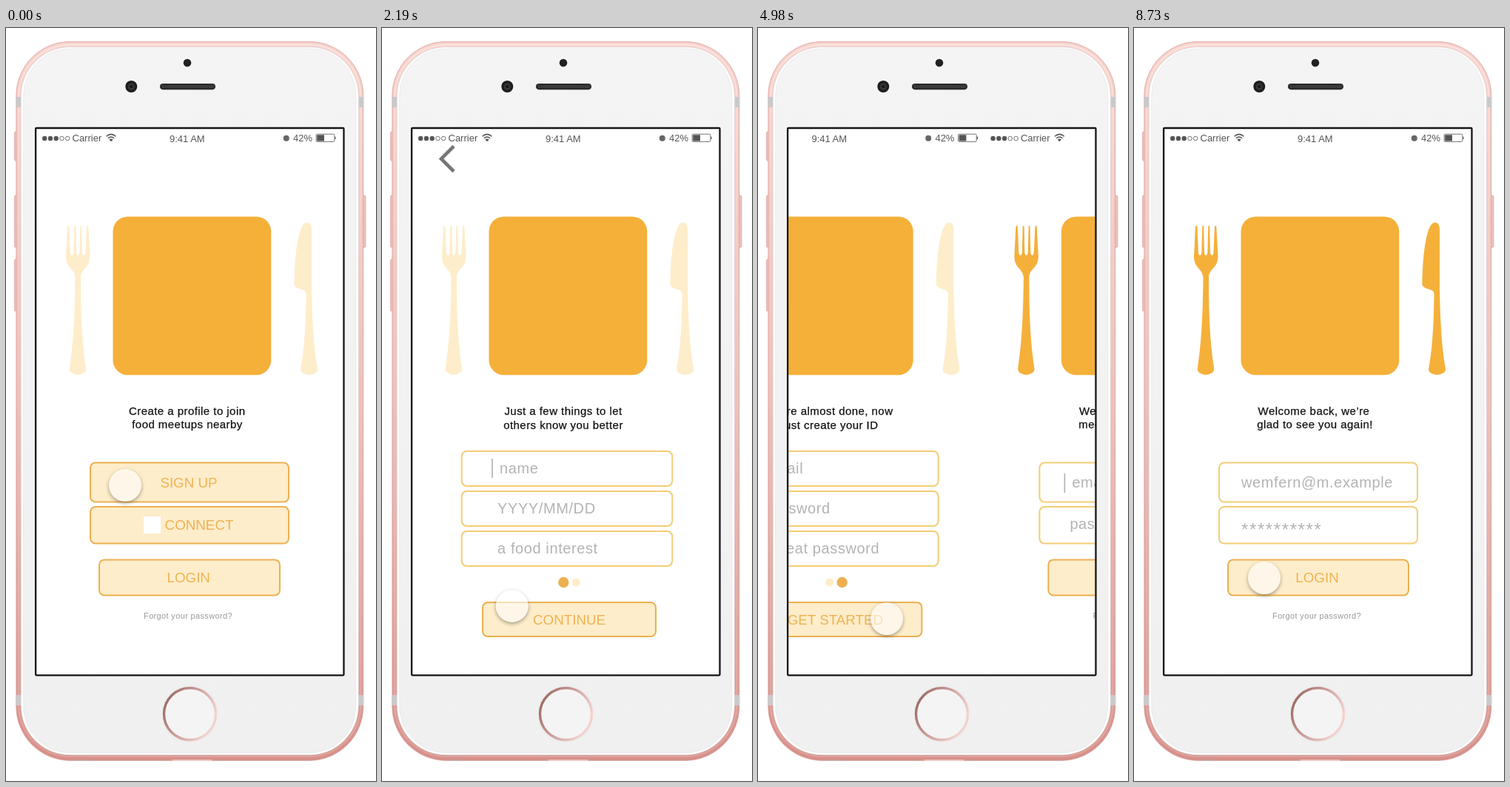
Recreate the animation shown at these times as an HTML page. Size 500 px wide and 1016 px high, loop 8.76 s.

```html
<!DOCTYPE html>
<html lang="en">
<head>
<meta charset="utf-8">
<title>Sign-up flow</title>
<style>
  html, body { margin: 0; width: 100%; height: 100%; overflow: hidden; background: #fff; }
  svg { display: block; position: absolute; left: 0; top: 0; }
  text { font-family: "Liberation Sans", Arial, sans-serif; }
  .status { font-size: 13px; fill: #555; }
  .title { font-size: 15px; letter-spacing: .45px; fill: #111; stroke: #111; stroke-width: .25px; text-anchor: middle; }
  .label { font-size: 18.8px; fill: #eeb252; text-anchor: middle; }
  .hint { font-size: 20px; letter-spacing: .6px; fill: #b3b3b3; }
  .mask { font-size: 24px; letter-spacing: 1.6px; fill: #b3b3b3; }
  .small { font-size: 11px; letter-spacing: .35px; fill: #999; text-anchor: middle; }
  #cursor {
    position: absolute; left: -22px; top: -22px; width: 44px; height: 44px; border-radius: 50%;
    background: rgba(255, 255, 255, .6); box-shadow: 0 2px 5px rgba(0, 0, 0, .36);
  }
</style>
</head>
<body>
<svg width="500" height="1016" viewBox="0 0 500 1016">
  <defs>
    <linearGradient id="rose" x2="0" y2="1">
      <stop offset="0" stop-color="#f7cfc9"/><stop offset=".5" stop-color="#edc0bb"/><stop offset="1" stop-color="#d68f89"/>
    </linearGradient>
    <linearGradient id="rim" x2="0" y2="1">
      <stop offset="0" stop-color="#fbe0dc"/><stop offset="1" stop-color="#dfa29c"/>
    </linearGradient>
    <linearGradient id="ring" x2="1" y2=".5">
      <stop offset="0" stop-color="#8f5f59"/><stop offset=".5" stop-color="#c99a94"/><stop offset="1" stop-color="#f1d3cf"/>
    </linearGradient>
    <linearGradient id="face" x2="0" y2="1">
      <stop offset="0" stop-color="#f4f4f4"/><stop offset="1" stop-color="#f0f0f0"/>
    </linearGradient>
    <clipPath id="display"><rect x="40" y="135" width="417" height="738"/></clipPath>
  </defs>

  <g fill="#eec3be" stroke="#d9a19b" stroke-width=".7">
    <rect x="11.4" y="140" width="5" height="39" rx="1.5"/>
    <rect x="11.4" y="226" width="5" height="70" rx="1.5"/>
    <rect x="11.4" y="312" width="5" height="70" rx="1.5"/>
    <rect x="480" y="226" width="6" height="70" rx="1.5"/>
  </g>
  <rect x="13.8" y="18.4" width="469" height="970" rx="73" fill="url(#rose)" stroke="#d9a19b" stroke-width=".8"/>
  <rect x="16" y="21" width="464.6" height="963" rx="70.5" fill="url(#rim)"/>
  <rect x="18.5" y="24" width="459.6" height="958" rx="68" fill="url(#rose)"/>
  <g fill="#c9c9cc">
    <rect x="13.6" y="93" width="7" height="14"/><rect x="476.2" y="93" width="7" height="14"/>
    <rect x="13.6" y="900" width="7" height="14"/><rect x="476.2" y="900" width="7" height="14"/>
  </g>
  <rect x="20.3" y="25.8" width="456" height="955" rx="66" fill="#fff" stroke="#ddd" stroke-width=".7"/>
  <rect x="23.8" y="28" width="449" height="950" rx="63" fill="url(#face)" stroke="#e6e6e6" stroke-width=".8"/>
  <path d="M225 988H278" stroke="#f3d6d2" stroke-width="1.6"/>
  <path d="M95 988H106" stroke="#b9b0af" stroke-width="1.4"/>

  <circle cx="245" cy="47" r="5.3" fill="#222"/>
  <circle cx="169.3" cy="79" r="8" fill="#1d1d1d"/>
  <circle cx="169.3" cy="79" r="4.6" fill="#363636"/>
  <circle cx="169.3" cy="79" r="2" fill="#151515"/>
  <rect x="208" y="75" width="75" height="8.2" rx="4.1" fill="#2a2a2a"/>
  <path d="M211 79.1H280" stroke="#4a4a4a" stroke-width="4" stroke-dasharray="1 1"/>
  <circle cx="248.5" cy="925.5" r="39" fill="#eee"/>
  <circle cx="248.5" cy="925.5" r="35" fill="#f4f4f4" stroke="url(#ring)" stroke-width="3.4"/>

  <rect x="40" y="135" width="417" height="738" fill="#fff"/>
  <g clip-path="url(#display)"><g id="strip"></g></g>
  <rect x="40.1" y="135" width="416.4" height="738.3" rx="1" fill="none" stroke="#161616" stroke-width="2.3"/>
</svg>
<div id="cursor"></div>

<script>
const LOOP = 8760, PAGE = 414;
const ORANGE = '#f5b03a', CREAM = '#feedca', AMBER = '#ecb050', GOLD = '#f3cd76';

const text = (cls, x, y, str) => `<text class="${cls}" x="${x}" y="${y}">${str}</text>`;
const box = (x, y, w, h, fill, stroke) =>
  `<rect x="${x}" y="${y}" width="${w}" height="${h}" rx="7" fill="${fill}" stroke="${stroke}" stroke-width="2"/>`;
const button = (x, y, w, h, label, labelX = x + w / 2) =>
  box(x, y, w, h, CREAM, AMBER) + text('label', labelX, y + h / 2 + 6.5, label);
const dot = (x, y, r, fill) => `<circle cx="${x}" cy="${y}" r="${r}" fill="${fill}"/>`;
const caret = y => `<path d="M149 ${y}v26" stroke="#b0b0b0" stroke-width="1.6"/>`;
const title = (x1, line1, x2, line2, gap = 18) =>
  text('title', x1, 522, line1) + text('title', x2, 522 + gap, line2);

const statusBar = [0, 1, 2, 3, 4].map(i =>
    `<circle cx="${52.2 + i * 7.75}" cy="149" r="${i < 3 ? 3.2 : 2.8}" fill="${i < 3 ? '#555' : 'none'}" stroke="#555" stroke-width="${i < 3 ? 0 : .8}"/>`).join('') +
  text('status', 89.5, 153, 'Carrier') + text('status', 221, 154, '9:41 AM') + text('status', 388, 153, '42%') +
  `<path d="M135.6 146.2Q142 140.6 148.4 146.2M137.8 148.8Q142 145.2 146.2 148.8" fill="none" stroke="#555" stroke-width="1.5"/>
   <path d="M139.4 150.4Q142 148.6 144.6 150.4L142 153.2Z" fill="#555"/>` +
  dot(378.8, 148.8, 4, '#666') +
  `<rect x="419.2" y="143.2" width="24.6" height="10.2" rx="1.2" fill="none" stroke="#666" stroke-width=".9"/>
   <path d="M420.2 144.2h9.8v8.2h-9.8zM444.4 146.6h1.2v3.4h-1.2z" fill="#555"/>`;

const FORK = 'M83 268Q84 265 85.5 268L87 304Q89.2 310 91.3 304L92.3 268Q93.3 265 94.3 268L95 304' +
  'Q97.2 310 99.3 304L100.3 268Q101.2 265 102.2 268L103 304Q105.2 310 107.4 304L109 268Q110.5 265 111.3 268' +
  'L113.5 308C113.5 324 102 324 101 336C101 390 103 425 108 458Q109 464 104 466Q97 470 90 466' +
  'Q85 464 86 458C91 425 93 390 93.5 336C92 324 81 324 81 308Z';
const KNIFE = 'M406 262.5C411 262 413 266 413 272V353C414 400 416 430 420.8 458Q422 464 417 466' +
  'Q410 470 402 466Q397 464 398.4 458C402 440 405 410 405.6 358C404 351 394 354 389.5 347' +
  'C389.5 315 394 264 406 262.5Z';
const setting = (forkFill, knifeFill) =>
  `<path d="${FORK}" fill="${forkFill}"/><path d="${KNIFE}" fill="${knifeFill}"/>
   <rect x="144.5" y="254.4" width="213.8" height="213.8" rx="20" fill="${ORANGE}"/>`;
const back = '<path d="M97 159.5L80 176.5L97 193.5" fill="none" stroke="#777" stroke-width="4.6"/>';

const formPage = (heading, hints, dots, action) => back + heading +
  hints.map((hint, i) => box(107.7, 571 + 54 * i, 284.6, 47, '#fff', GOLD) +
    text('hint', i ? 156 : 159, 601 + 54 * i, hint)).join('') +
  caret(581) + dots + button(136, 775, 234, 46, action);

const loginForm = box(115, 586.5, 268, 53, '#fff', GOLD) + box(115, 646, 268, 49.5, '#fff', GOLD) +
  button(127, 717.5, 244, 48, 'LOGIN', 247.5) + text('small', 247, 797, 'Forgot your password?');

const pages = [
  setting(CREAM, CREAM) +
    title(244.7, 'Create a profile to join', 245, 'food meetups nearby') +
    button(114, 586.5, 268, 53, 'SIGN UP', 247) + button(114, 646, 268, 49.5, 'CONNECT', 261) +
    '<rect x="186" y="659" width="23" height="23" fill="#fff"/>' +
    button(126, 717.5, 244, 48, 'LOGIN', 246.7) + text('small', 246, 797, 'Forgot your password?'),
  setting(CREAM, CREAM) + formPage(
    title(245, 'Just a few things to let', 245, 'others know you better', 19),
    ['name', 'YYYY/MM/DD', 'a food interest'],
    dot(245.3, 748, 7.2, AMBER) + dot(262.3, 748, 5.6, CREAM), 'CONTINUE'),
  setting(ORANGE, CREAM) + formPage(
    title(244, 'You’re almost done, now', 246, 'just create your ID', 19),
    ['email', 'password', 'repeat password'],
    dot(245.3, 748, 5.6, CREAM) + dot(262.3, 748, 7.2, AMBER), 'GET STARTED'),
  setting(ORANGE, ORANGE) + loginForm +
    `<g id="empty">${title(239.5, 'We’re finished, start', 246.5, 'meeting people today!')}
      ${caret(601)}${text('hint', 159, 620, 'email or username')}${text('hint', 156, 676, 'password')}</g>
    <g id="filled">${title(243, 'Welcome back, we’re', 244.5, 'glad to see you again!')}
      ${text('hint', 145, 620, 'wemfern@m.example')}${text('mask', 145, 684.5, '**********')}</g>`
];

const byId = id => document.getElementById(id);
byId('strip').innerHTML = pages.map((page, i) =>
  `<g transform="translate(${i * PAGE} 0)">${statusBar}${page}</g>`).join('');
const strip = byId('strip'), empty = byId('empty'), filled = byId('filled'), cursor = byId('cursor');

const clamp = v => Math.min(1, Math.max(0, v));
const smooth = u => u * u * (3 - 2 * u);

// Critically damped spring from 0 to 1.
const spring = ms => {
  const x = Math.max(0, ms) * 0.012;
  return 1 - (1 + x) * Math.exp(-x);
};
const slideStarts = [643, 2767, 4876];

// Pointer stops: time, x, y
const stops = [
  [0, 161, 617], [500, 173, 613], [1300, 173, 613], [2399, 176, 797],
  [2650, 174, 797], [6000, 174, 797], [7250, 176, 742], [LOOP, 176, 742]
];
function pointerAt(t) {
  const i = stops.findIndex(s => s[0] > t);
  const [t0, x0, y0] = stops[i - 1], [t1, x1, y1] = stops[i];
  const u = smooth((t - t0) / (t1 - t0));
  return [x0 + (x1 - x0) * u, y0 + (y1 - y0) * u];
}

const began = performance.now();
function draw() {
  const t = (performance.now() - began) % LOOP;
  const scroll = slideStarts.reduce((sum, start) => sum + spring(t - start), 0) * PAGE;
  strip.setAttribute('transform', `translate(${-scroll} 0)`);
  const fade = clamp((t - 7300) / 250);
  empty.setAttribute('opacity', 1 - fade);
  filled.setAttribute('opacity', fade);
  const [x, y] = pointerAt(t);
  cursor.style.transform = `translate(${x}px, ${y}px)`;
  requestAnimationFrame(draw);
}
draw();
</script>
</body>
</html>
```
